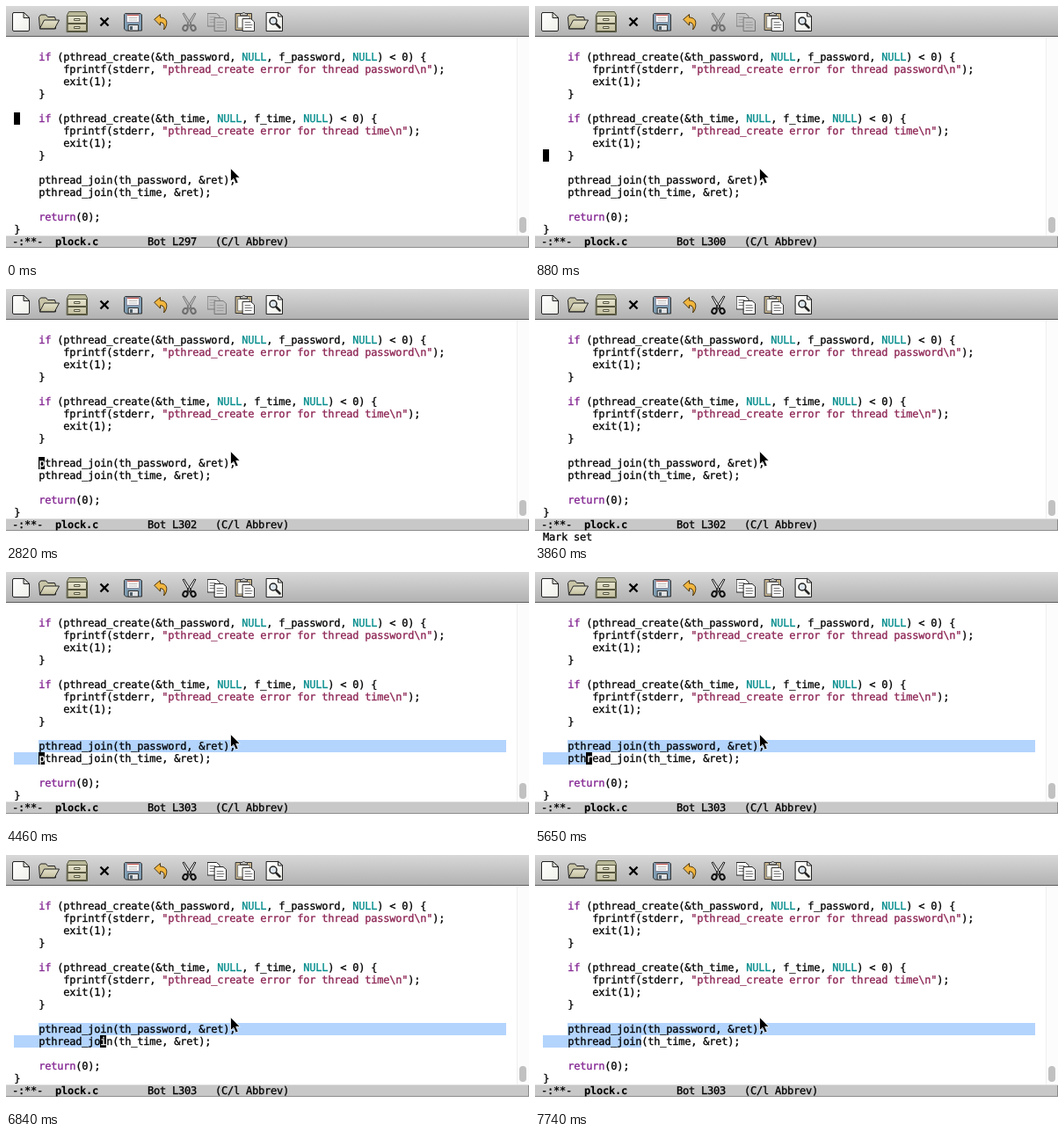
These frames come from a looping animation (595x290 px, 8000 ms). An HTML page:

```html
<!DOCTYPE html>
<html lang="en">
<head>
<meta charset="utf-8">
<title>Editor: marking a region</title>
<style>
html, body { margin: 0; width: 100%; height: 100%; overflow: hidden; background: #fff; }
#stage {
  position: relative; width: 595px; height: 290px; overflow: hidden;
  background: #fff; isolation: isolate;
  font: 12px/14px "DejaVu Sans Mono", "Liberation Mono", monospace;
  letter-spacing: calc(7px - 1ch);
  -webkit-text-stroke: .3px;
  text-rendering: geometricPrecision; font-variant-ligatures: none; color: #000;
}
#stage > * { position: absolute; }
pre { margin: 0; font: inherit; }
b { -webkit-text-stroke: .1px; }
.k { color: #80208f; }
.c { color: #008b8b; }
.s { color: #8b2252; }

#tools { left: 0; top: 0; }
#code { left: 9.300px; top: 51px; }
#mode {
  left: 0; top: 261px; width: 588px; height: 14px; padding-left: 7px;
  background: #c8c8c8; box-shadow: inset 0 1px #dcdcdc, inset -1px -1px #8c8c8c;
}
#num { display: inline-block; height: 14px; overflow: hidden; vertical-align: top; }
#num span { display: block; --dy: -14px; }
#echo { left: 9px; top: 275px; }
#bar { left: 581px; top: 36px; width: 13px; height: 225px; background: #fcfcfc; border-left: 1px solid #efefef; }
#bar::after {
  content: ""; position: absolute; left: 2px; top: 204px; width: 8px; height: 18px;
  border-radius: 4px; background: #c1c1c1;
}
.region { height: 14px; background: #b3d4fd; }
#full { left: 37px; top: 191px; width: 532px; }
#part { left: 9px; top: 205px; }
#point { left: 9px; top: 121px; height: 14px; --dy: 14px; }
#point::after {
  content: ""; position: absolute; left: 100%; top: 0; width: 7px; height: 14px;
  background: #fff; mix-blend-mode: difference;
}
#mouse { left: 0; top: 0; }

#num span { animation: rows 8s step-end infinite; }
#point { animation: rows 8s step-end infinite, cols 8s step-end infinite; }
#point::after { animation: blink 8s step-end infinite; }
#part { animation: cols 8s step-end infinite, mark 8s step-end infinite; }
#full { animation: mark 8s step-end infinite; }
#echo { animation: echo 8s step-end infinite; }
.edit { animation: enable 8s step-end infinite; }

@keyframes rows {
  0% { margin-top: 0; }
  5.5% { margin-top: var(--dy); }
  9.25% { margin-top: calc(var(--dy) * 2); }
  11% { margin-top: calc(var(--dy) * 3); }
  12.875% { margin-top: calc(var(--dy) * 4); }
  14.625% { margin-top: calc(var(--dy) * 5); }
  55.75%, 100% { margin-top: calc(var(--dy) * 6); }
}
@keyframes cols {
  0% { width: 0; }
  29.625% { width: 7px; }
  31.5% { width: 14px; }
  33.375% { width: 21px; }
  35.25% { width: 28px; }
  65% { width: 35px; }
  66.875% { width: 42px; }
  70.625% { width: 49px; }
  72.5% { width: 56px; }
  74.375% { width: 63px; }
  76.25% { width: 70px; }
  80% { width: 77px; }
  81.875% { width: 84px; }
  83.75% { width: 91px; }
  85.5% { width: 98px; }
  89.25% { width: 105px; }
  91.125%, 100% { width: 112px; }
}
@keyframes blink {
  0%, 5.5%, 27.75%, 55.75%, 65% { opacity: 1; }
  1.875%, 22.125%, 48.25%, 63.125%, 96.75%, 100% { opacity: 0; }
}
@keyframes mark {
  0% { opacity: 0; }
  55.75%, 100% { opacity: 1; }
}
@keyframes echo {
  0%, 55.75%, 100% { opacity: 0; }
  42.625% { opacity: 1; }
}
@keyframes enable {
  0% { opacity: .45; fill: #bbb; }
  42.625%, 100% { opacity: 1; fill: #fff; }
}
</style>
</head>
<body>
<div id="stage">
  <svg id="tools" width="595" height="36" fill="none" stroke-linejoin="round" stroke-linecap="round">
    <defs>
      <linearGradient id="steel" x2="0" y2="1">
        <stop stop-color="#d8d8d8"/><stop offset="1" stop-color="#b2b2b2"/>
      </linearGradient>
      <linearGradient id="paper" x2="1" y2="1">
        <stop stop-color="#fff"/><stop offset="1" stop-color="#efefea"/>
      </linearGradient>
      <linearGradient id="tan" x2="0" y2="1">
        <stop stop-color="#e6e3cd"/><stop offset="1" stop-color="#c3bf9f"/>
      </linearGradient>
    </defs>
    <path fill="url(#steel)" d="M0 0h595v34H0z"/>
    <path fill="#5c5c5c" d="M0 34h595v1H0z"/>

    <g stroke="#222">
      <!-- new -->
      <path fill="url(#paper)" d="M9 7.500h11l6.500 6v13.500q0 1.500-1.500 1.500H9q-1.500 0-1.500-1.500V9q0-1.500 1.500-1.500z"/>
      <path fill="#d8d8d2" d="M20 7.500v6h6.500z"/>
      <!-- open -->
      <path fill="#c9c5a8" d="M38.500 25.500l-1-13 2-2.500h6l2 2.500h8l1 3v10z"/>
      <path fill="url(#tan)" d="M38.500 25.500l5-9.500h17l-5 9.500z"/>
      <!-- directory -->
      <g stroke="#55553f">
        <path fill="#b9b899" d="M69.500 10.500l2-4h19l2 4v19h-23z"/>
        <path fill="url(#tan)" d="M70.500 11.500h21v8h-21zM70.500 20.500h21v8h-21z"/>
        <path fill="#f4f2e2" d="M78 14.500h6v2h-6zM78 23.500h6v2h-6z"/>
      </g>
    </g>

    <!-- close -->
    <path stroke="#000" stroke-width="2.400" stroke-linecap="butt" d="M107.500 13.500l9 9M116.500 13.500l-9 9"/>

    <!-- save -->
    <g stroke="#333">
      <path fill="#7f9db3" d="M136 8.500h17l1.500 1.500v18h-18l-2-2V10z"/>
      <path fill="#fbfbfb" stroke="#889" d="M137.500 9.500h14v9h-14z"/>
      <path stroke="#c8574c" d="M138.500 10.500h12"/>
      <path stroke="#bbb" d="M140 13.500h9M140 16h9"/>
      <path fill="#e0e2e4" d="M139.500 21.500h11v6.500h-11z"/>
      <path fill="#4d5d68" stroke="none" d="M141 23h3v4h-3z"/>
    </g>

    <!-- undo -->
    <path fill="#f2b63e" stroke="#4a3208" d="M169 15l6.500-5.500v3.500c6 .2 8.500 3.800 6.800 9.500q-.8 2.600-2.800 4.500c1.500-5.500.2-8.300-4-8.300v3z"/>

    <!-- cut -->
    <g class="edit" stroke="#111">
      <path d="M201.500 8.500l1-.5 8.500 13-2 1.500zM215.500 8.500l-1-.5-8.500 13 2 1.500z"/>
      <g fill="none" stroke-width="2">
        <ellipse cx="204" cy="25" rx="2.600" ry="3.100" transform="rotate(25 204 25)"/>
        <ellipse cx="213" cy="25" rx="2.600" ry="3.100" transform="rotate(-25 213 25)"/>
      </g>
    </g>
    <!-- copy -->
    <g class="edit" stroke="#222">
      <path d="M229.500 8.500h10l3.500 3v11.500h-13.500z"/>
      <path stroke="#777" d="M232 12.500h6M232 15.500h6M232 18.500h5"/>
      <path d="M237.500 13.500h9.500l3.500 3v12h-13z"/>
      <path stroke="#777" d="M240 18.500h7M240 21.500h8M240 24.500h7"/>
    </g>

    <!-- paste -->
    <g stroke="#333">
      <path fill="#c8b58c" d="M261.500 8.500h18v19h-18z"/>
      <path fill="#f8f7f0" stroke="#777" d="M264 11.500h13v13.500h-13z"/>
      <path fill="#ccc" d="M266.500 10.500v-2h2.500q1.500-3 3 0h2.500v2z"/>
      <path fill="#fff" d="M269.500 14.500h9l4 3.500v10.500h-13z"/>
      <path stroke="#777" d="M272 18.500h6M272 21.500h8M272 24.500h7"/>
    </g>

    <!-- search -->
    <path fill="url(#paper)" stroke="#222" d="M296.500 7.500h13l5 4.500v16.500h-18z"/>
    <path fill="#ddd" stroke="#222" d="M309.500 7.500v4.500h5z"/>
    <circle cx="304" cy="17" r="4" fill="#dde6ec" stroke="#222" stroke-width="1.500"/>
    <path stroke="#222" stroke-width="2.500" d="M307.500 20.500l4 4"/>
  </svg>

  <div id="full" class="region"></div>
  <div id="part" class="region"></div>
  <div id="bar"></div>

<pre id="code">    <span class="k">if</span> (pthread_create(&amp;th_password, <span class="c">NULL</span>, f_password, <span class="c">NULL</span>) &lt; 0) {
        fprintf(stderr, <span class="s">"pthread_create error for thread password\n"</span>);
        exit(1);
    }

    <span class="k">if</span> (pthread_create(&amp;th_time, <span class="c">NULL</span>, f_time, <span class="c">NULL</span>) &lt; 0) {
        fprintf(stderr, <span class="s">"pthread_create error for thread time\n"</span>);
        exit(1);
    }

    pthread_join(th_password, &amp;ret);
    pthread_join(th_time, &amp;ret);

    <span class="k">return</span>(0);
}</pre>

  <pre id="mode">-:**-  <b>plock.c</b>        Bot L<span id="num"><span>297
298
299
300
301
302
303</span></span>   (C/l Abbrev)</pre>
  <div id="echo">Mark set</div>
  <div id="point"></div>

  <svg id="mouse" width="595" height="290">
    <path fill="#000" stroke="#fff" stroke-width=".8" stroke-linejoin="round" d="M255.500 184.500v15l3.400-3.200 2.500 5.700 2.800-1.200-2.500-5.500h4.600z"/>
  </svg>
</div>
</body>
</html>
```
